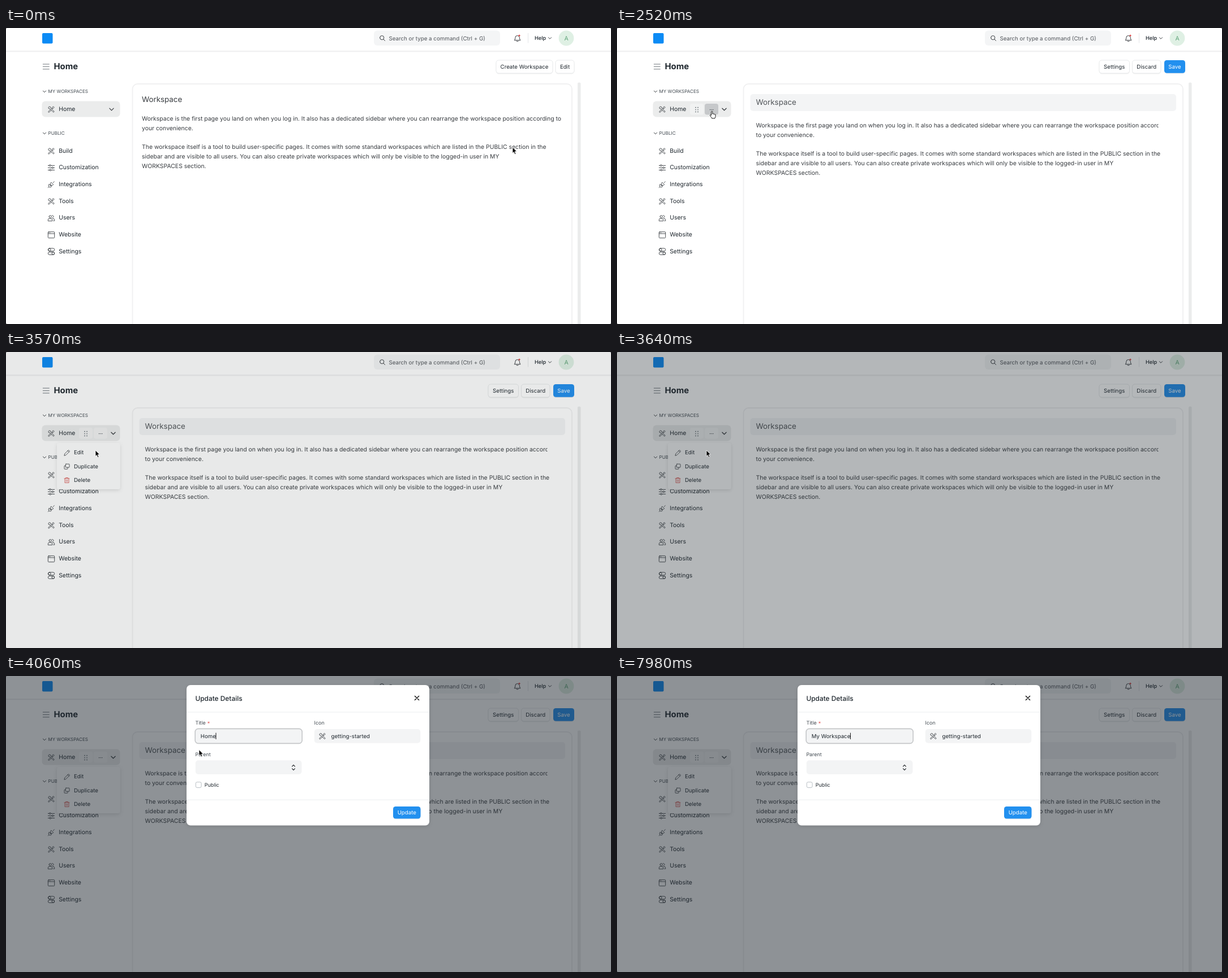
An HTML page for the animation above (8000 ms loop, 1069 px wide and 524 px high).

```html
<!DOCTYPE html>
<html lang="en">
<head>
<meta charset="utf-8">
<title>Workspace editing</title>
<style>
html, body { margin: 0; width: 100%; height: 100%; overflow: hidden; background: #fff; }
svg { display: block; width: 100vw; height: 100vh; }
text { font-family: Inter, "Open Sans", sans-serif; white-space: pre; text-rendering: geometricPrecision; }
.line { fill: none; stroke: #383c40; stroke-width: 1; stroke-linecap: round; stroke-linejoin: round; }
</style>
</head>
<body>
<svg id="stage" viewBox="0 0 1069 524" xmlns="http://www.w3.org/2000/svg"></svg>
<script>
const LOOP = 8000, STEP = 70;
const INK = '#1f272e', BODY = '#383c40', BLUE = '#2490ef', FIELD = '#f3f4f5';
const BASE = 9.69, MEDIUM = 10.43, SMALL = 8.94;

// y is the middle of the capitals
const text = (x, y, s, size = BASE, fill = INK, more = '') =>
  `<text x="${x}" y="${(y + size * 0.364).toFixed(2)}" font-size="${size}" fill="${fill}" ${more}>${s}</text>`;
const rect = (x, y, w, h, r, fill, more = '') =>
  `<rect x="${x}" y="${y}" width="${w}" height="${h}" rx="${r}" fill="${fill}" ${more}/>`;
const line = (d, more = '') => `<path class="line" d="${d}" ${more}/>`;
const group = (id, body, more = '') => `<g id="${id}" ${more}>${body}</g>`;
const chevron = (x, y, r, w = 1) =>
  line(`M${x - r} ${y - r / 2}l${r} ${r}l${r} ${-r}`, `style="stroke-width:${w}"`);
const button = (x, w, label, y = 57, h = 23) =>
  rect(x, y, w, h, 4.5, '#fff', 'stroke="#e4e6e8" stroke-width=".8" filter="url(#soft)"') +
  text(x + w / 2, y + h / 2 + 0.2, label, BASE, INK, 'text-anchor="middle"');
const primary = (x, y, w, h, label) =>
  rect(x, y, w, h, 4.5, BLUE, 'filter="url(#soft)"') +
  text(x + w / 2, y + h / 2 + 0.2, label, BASE, '#fff', 'text-anchor="middle"');

const ICONS = {
  tool: 'M2 3.5L3.5 2 6.3 2.8 7 5.3 13.7 12a1.2 1.2 0 0 1-1.8 1.8L5.2 7 2.7 6.3ZM9.4 6.2L10 3.8 12.4 1.8 14.2 3.6 12.2 6 9.8 6.6M6.4 8.2L1.8 12.6a1.1 1.1 0 0 0 1.6 1.6L8 9.8',
  sliders: 'M1 3h2.5M7 3h8M1 8h8M12.5 8H15M1 13h3M7.5 13H15M3.5 3a1.7 1.7 0 1 0 3.5 0a1.7 1.7 0 1 0-3.5 0M9 8a1.7 1.7 0 1 0 3.5 0a1.7 1.7 0 1 0-3.5 0M4 13a1.7 1.7 0 1 0 3.5 0a1.7 1.7 0 1 0-3.5 0',
  plug: 'M8 3.5L12.5 8 11 9.5a3.2 3.2 0 0 1-4.5-4.5ZM12 4l2.5-2.5M3.5 7.5L8.5 12.5 7 13.5a3.4 3.4 0 0 1-4.6-4.6ZM2.5 13.5L1 15M5.5 9.5L7 8M7 11L8.5 9.5',
  users: 'M3.2 5a2.5 2.7 0 1 0 5 0a2.5 2.7 0 1 0-5 0M1 14v-2q0-3 3-3h3q3 0 3 3v2ZM9.5 2.5a2.5 2.6 0 1 1 .6 5M11.5 9q3.5 0 3.5 3v2h-2.5',
  browser: 'M2.5 1.5h11q1.5 0 1.5 1.5v10.5q0 1.5-1.5 1.5h-11q-1.5 0-1.5-1.5V3q0-1.5 1.5-1.5ZM1 5.5h14M3.3 3.5h.2M5.5 3.5h.2',
  toggles: 'M4 1h8a3 3 0 0 1 0 6H4a3 3 0 0 1 0-6ZM4 9h8a3 3 0 0 1 0 6H4a3 3 0 0 1 0-6ZM1.3 4a2.8 2.8 0 1 0 5.6 0a2.8 2.8 0 1 0-5.6 0M9.2 12a2.8 2.8 0 1 0 5.6 0a2.8 2.8 0 1 0-5.6 0',
  pencil: 'M2 14l1-4L11 2q1-1 2 0l1 1q1 1 0 2L6 13ZM10 3l3 3',
  copy: 'M6 2h7q1 0 1 1v6q0 1-1 1H6q-1 0-1-1V3q0-1 1-1ZM5 6H3q-1 0-1 1v6q0 1 1 1h6q1 0 1-1v-3',
  trash: 'M2 4h12M5.5 4V2h5v2M3.3 4v10h9.4V4M6.4 7v4.5M9.6 7v4.5',
};
const icon = (name, x, y, size = 13, color = BODY) =>
  `<g transform="translate(${x - size / 2} ${y - size / 2}) scale(${size / 16})">` +
  line(ICONS[name], `style="stroke:${color};stroke-width:1.1"`) + '</g>';

const LINES = [
  'Workspace is the first page you land on when you log in. It also has a dedicated sidebar where you can rearrange the workspace position according',
  'The workspace itself is a tool to build user-specific pages. It comes with some standard workspaces which are listed in the PUBLIC section in the',
  'sidebar and are visible to all users. You can also create private workspaces which will only be visible to the logged-in user in MY',
  'WORKSPACES section.',
];
function article(x, y, first, second, clip = '') {
  const row = (s, n, more) => text(x, y + n * 16.7, s, MEDIUM, BODY, more);
  return row(first, 0, clip) + row(second, 1) + LINES.slice(1).map((s, i) => row(s, i + 3)).join('');
}

const defs = `<defs>
  <filter id="soft" x="-10%" y="-20%" width="120%" height="150%"><feDropShadow dx="0" dy=".7" stdDeviation=".7" flood-opacity=".13"/></filter>
  <filter id="deep" x="-10%" y="-10%" width="120%" height="125%"><feDropShadow dx="0" dy="2" stdDeviation="3" flood-opacity=".13"/></filter>
  <clipPath id="cut"><rect x="240" y="160" width="716.7" height="26"/></clipPath>
</defs>`;

const navbar = rect(0, 40, 1069, 2.4, 0, '#f0f0f1') +
  rect(64, 9, 18.5, 18.5, 2, '#0c8bf5') +
  rect(650, 4.5, 223, 26.5, 6, '#f4f5f6') +
  line('M660.6 17.2a3.6 3.6 0 1 0 7.2 0a3.6 3.6 0 1 0-7.2 0M667 20l2.6 2.6') +
  text(676.4, 18, 'Search or type a command (Ctrl + G)', 9.78, '#505459') +
  line('M898.5 21.5q1.3-1 1.3-4.2a3.8 3.8 0 0 1 7.6 0q0 3.2 1.3 4.2ZM902 23.3q1.6 1.3 3.2 0') +
  '<circle cx="907" cy="13.2" r="1.5" fill="#e24c4c"/>' +
  rect(922, 9, 1, 17.5, 0, '#e4e6e8') +
  text(934, 18, 'Help', 9.2, INK, 'font-weight="500"') + chevron(961, 18, 2.6) +
  '<circle cx="990" cy="18" r="13.4" fill="#dff0e4"/>' +
  text(990, 18.2, 'A', 10.4, '#5fa478', 'text-anchor="middle"');

const items = [['tool', 'Build'], ['sliders', 'Customization'], ['plug', 'Integrations'],
  ['tool', 'Tools'], ['users', 'Users'], ['browser', 'Website'], ['toggles', 'Settings']];
const sidebar =
  line('M65.3 64h11M65.3 68.4h11M65.3 72.8h11', 'style="stroke:#70777d"') +
  text(84.4, 67.4, 'Home', 14.9, INK, 'font-weight="700"') +
  chevron(68, 112.5, 2.6) + text(74.5, 112, 'MY WORKSPACES', 8.05, '#424a51') +
  rect(63.5, 129.5, 138, 28, 6, '#ebecec') +
  icon('tool', 80, 144) + text(93.2, 143.2, 'Home', MEDIUM) +
  chevron(68, 186.5, 2.6) + text(74.5, 186, 'PUBLIC', 8.1, '#424a51') +
  items.map(([name, label], i) => {
    const y = 217 + i * 29.65;
    return icon(name, 80, y + 0.8) + text(93.2, y, label, MEDIUM);
  }).join('');

const card = rect(223.5, 99, 776.5, 440, 9, '#fff', 'stroke="#f0f0f1" stroke-width="1.8"') +
  rect(1010, 96.5, 5.5, 440, 2, '#ebecec');

const grip = [0, 1, 2].map(r => [0, 1].map(c =>
  `<circle cx="${139 + c * 4}" cy="${140.8 + r * 3.8}" r=".95" fill="#6f777d"/>`).join('')).join('');
const dots = [0, 1, 2].map(c => `<circle cx="${164.6 + c * 2.6}" cy="144.6" r=".7" fill="${INK}"/>`).join('');

const viewMode = group('view',
  button(866, 100, 'Create Workspace') + button(971, 33, 'Edit') + chevron(186.5, 144, 3.6, 1.2) +
  text(240, 126.4, 'Workspace', 13.35, BODY) +
  article(240, 160.3, LINES[0] + ' to', 'your convenience.'));
const editMode = group('edit',
  button(852, 53.5, 'Settings') + button(910.5, 50.5, 'Discard') + primary(967, 57, 37, 22.7, 'Save') +
  rect(129, 134, 24, 19.5, 4, '#f1f2f2') + grip +
  rect(155, 134, 24, 19.5, 4, '#f1f2f2', 'id="more"') + dots + chevron(189.5, 144, 3.6, 1.3) +
  rect(235.5, 117, 752.5, 30, 5, '#f3f4f5') + text(245.6, 131.5, 'Workspace', 13.35, '#505458') +
  article(245.6, 172.3, LINES[0], 'to your convenience.', 'clip-path="url(#cut)"'));

const menu = group('menu', rect(90, 161, 111.5, 82, 4, '#fff', 'filter="url(#deep)"') +
  [['pencil', 'Edit'], ['copy', 'Duplicate'], ['trash', 'Delete']].map(([name, label], i) =>
    icon(name, 107.5, 178.6 + i * 24.2, 12, i === 2 ? '#d9534f' : BODY) +
    text(119.9, 177.9 + i * 24.2, label)).join(''));

const modal = group('modal',
  rect(319, 16, 429, 248.5, 7, '#fff', 'filter="url(#deep)"') +
  text(334.4, 40.1, 'Update Details', 11.9, INK, 'font-weight="500"') +
  line('M722.4 35.4l7.2 7.2m0-7.2l-7.2 7.2', 'style="stroke:#111;stroke-width:1.4"') +
  rect(319, 63.5, 429, 1, 0, '#ebeef0') + rect(319, 218.7, 429, 1, 0, '#ebeef0') +
  text(334.4, 83.2, 'Title', SMALL, '#424a51') + text(355.8, 83.6, '*', SMALL, '#e24c4c') +
  text(544.6, 83.2, 'Icon', SMALL, '#424a51') + text(334.4, 138.4, 'Parent', SMALL, '#424a51') +
  rect(334.8, 94, 187.7, 24.7, 5, FIELD) +
  rect(334.2, 93.4, 189, 26, 5.5, 'none', 'id="ring" stroke="#c4c6c8" stroke-width="1.6"') +
  text(343.7, 106.3, '', BASE, INK, 'id="title"') +
  rect(0, 100.6, 0.9, 11.4, 0, '#000', 'id="caret"') +
  rect(544.8, 94, 187.5, 24.7, 5, FIELD) + icon('tool', 559, 106.4) + text(574.5, 106.3, 'getting-started') +
  rect(334.8, 149.3, 187.7, 24.7, 5, FIELD) +
  line('M505.6 160l2.4-2.5 2.4 2.5M505.6 164l2.4 2.5 2.4-2.5', 'style="stroke-width:1.2"') +
  rect(335.3, 187.8, 9.8, 9.8, 2.4, '#fff', 'stroke="#b8bec4" stroke-width="1"') +
  text(350.8, 192.6, 'Public', SMALL, INK) +
  primary(684, 231, 48.5, 21.5, 'Update'));

const pointer = group('pointer',
  '<path id="arrow" d="M0 0V10.6L2.3 8.5 4.1 12.5 5.9 11.7 4.2 7.8 7.4 7.6Z" fill="#000" stroke="#fff" stroke-width=".8"/>' +
  '<path id="hand" d="M-1.4 1q0-1.2 1.1-1.2t1.1 1.2V4.6q1.1-.9 1.9.3 1.2-.7 1.8.5 1.5-.4 1.5 1.1v2.6q0 1.4-1 2.6v.8H-.5v-.8Q-2 10-3.4 7.6q-.5-1.3.6-1.4.7 0 1.4.9Z" fill="#fff" stroke="#000" stroke-width=".9"/>' +
  '<path id="beam" class="line" d="M-2-5.6q2 0 2 1.4 0-1.4 2-1.4M0-4.2V4.2M-2 5.6q2 0 2-1.4 0 1.4 2 1.4" style="stroke:#000;stroke-width:.9"/>');

document.getElementById('stage').innerHTML = defs + rect(0, 0, 1069, 524, 0, '#777') +
  rect(0, 0, 1069, 524, 2.2, '#fff') + navbar + sidebar + card + viewMode + editMode + menu +
  rect(0, 0, 1069, 524, 0, INK, 'id="shade"') + modal + pointer;

const el = id => document.getElementById(id);
const show = (id, on) => el(id).setAttribute('visibility', on ? 'inherit' : 'hidden');
const clamp = v => Math.max(0, Math.min(1, v));

// time, x, y
const ROUTE = [
  [0, 895, 211], [210, 926, 163], [420, 979, 84], [490, 982, 77.5], [1050, 982, 77.5],
  [1190, 955, 84], [1400, 770, 125], [1680, 425, 165], [1890, 262, 163], [2100, 198, 149],
  [2310, 176, 146], [2520, 168, 147.5], [2730, 168, 147.5], [2940, 164, 158], [3290, 158, 174],
  [3710, 158, 174], [3850, 215, 161], [4060, 341, 130.5], [4200, 378, 116], [4410, 391.5, 112],
];
function pointerAt(t) {
  const i = ROUTE.findIndex(p => p[0] > t);
  if (i < 0) return ROUTE[ROUTE.length - 1].slice(1);
  const [t0, x0, y0] = ROUTE[i - 1], [t1, x1, y1] = ROUTE[i];
  const k = (t - t0) / (t1 - t0);
  return [x0 + (x1 - x0) * k, y0 + (y1 - y0) * k];
}

const ERASE = [4620, 4900, 5180, 5460];
const TYPE = [6020, 6230, 6440, 6650, 6930, 7000, 7280, 7420, 7560, 7700, 7840, 7980];
function titleAt(t) {
  const passed = list => list.filter(k => k <= t).length;
  return t < TYPE[0] ? 'Home'.slice(0, 4 - passed(ERASE)) : 'My Workspace'.slice(0, passed(TYPE));
}

function draw(time) {
  const t = Math.floor(time / STEP) * STEP;
  const [x, y] = pointerAt(t);
  const inside = (l, top, r, b) => x >= l && x <= r && y >= top && y <= b;
  const editing = t >= 840, focused = t >= 4060;

  show('view', !editing);
  show('edit', editing);
  show('menu', t >= 2800);
  el('more').setAttribute('fill', t < 3500 && inside(155, 134, 179, 153) ? '#c6c8ca' : '#f1f2f2');
  el('shade').setAttribute('opacity', 0.5 * clamp((t - 3540) / 150));

  const slide = 1 - (1 - clamp((t - 3720) / 300)) ** 2;
  el('modal').setAttribute('opacity', clamp((t - 3720) / 150));
  el('modal').setAttribute('transform', `translate(0 ${-37 * (1 - slide)})`);
  show('modal', t > 3720);
  show('ring', focused);
  el('title').textContent = titleAt(t);
  el('caret').setAttribute('x', 343.4 + el('title').getComputedTextLength());
  show('caret', focused && !(t >= 5670 && t < TYPE[0]));

  const overField = t > 4000 && inside(335, 94, 522, 119);
  const overLink = t < 3500 && (inside(967, 57, 1004, 80) || inside(64, 130, 201, 157));
  show('pointer', t < ERASE[0]);
  el('pointer').setAttribute('transform', `translate(${x} ${y})`);
  show('beam', overField);
  show('hand', overLink);
  show('arrow', !overField && !overLink);
}

const start = performance.now();
function tick(now) {
  draw(Math.max(0, now - start) % LOOP);
  requestAnimationFrame(tick);
}
draw(0);
requestAnimationFrame(tick);
</script>
</body>
</html>
```
